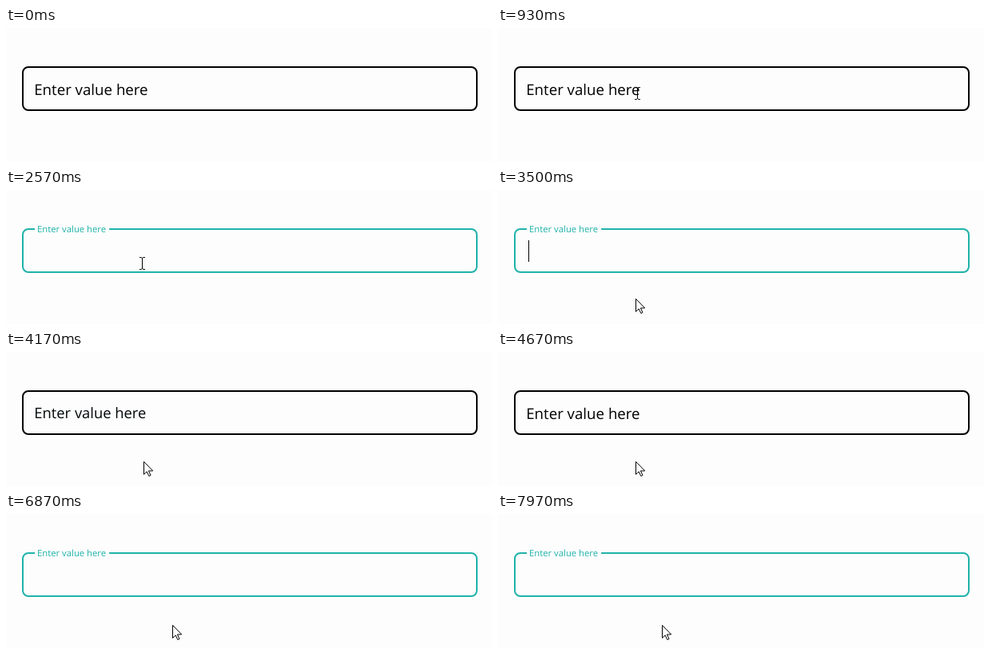
Write an HTML page that moves like this. It is 608 px wide and 168 px high and loops after 8000 ms.

```html
<!DOCTYPE html>
<html lang="en">
<head>
<meta charset="utf-8">
<title>Floating label input</title>
<style>
  html, body { margin: 0; width: 100%; height: 100%; overflow: hidden; background: #fdfdfd; }
  svg { display: block; width: 608px; height: 168px; }
  text { font-family: "Open Sans", "Noto Sans", sans-serif; text-rendering: geometricPrecision; }
</style>
</head>
<body>
<svg viewBox="0 0 608 168">
  <rect width="608" height="168" fill="#fdfdfd"/>
  <rect id="box" x="21" y="49" width="568" height="54" rx="7" fill="none" stroke-width="2"/>
  <rect id="caret" x="38" y="63" width="1" height="27"/>
  <rect id="patch" fill="#fdfdfd"/>
  <text id="label">Enter value here</text>
  <g id="tip">
    <rect x="179" y="107" width="136" height="23" fill="#14141c"/>
    <text x="185.5" y="123" font-size="11.55" fill="#e6e6ea">Please fill out this field.</text>
  </g>
  <path id="beam" fill="none" stroke="#000" d="M-3-7.5H-1L.5-6.5 2-7.5H4M.5-6.5V6.5M-3 7.5H-1L.5 6.5 2 7.5H4"/>
  <path id="arrow" fill="#fff" stroke="#000" d="M.5.5V16.5L4.2 13 6.8 18.6 9 17.6 6.4 12H11.7Z"/>
</svg>
<script>
const LOOP = 8000, BLINK = 530, SHIFT = 300;
const SESSIONS = [[1985, 3950], [5885, Infinity]]; // focus, blur
const TIP = [1720, 1985];
const TEAL = [32, 178, 170];
const MOUSE = [ // time, x, y
  [120, 577, -20], [830, 176, 78], [1150, 170, 92],
  [3180, 170, 92], [3330, 171, 114], [3460, 172, 136], [3620, 172, 137],
  [4950, 172, 137], [5180, 200, 112], [5560, 209, 78],
  [6480, 209, 78], [6670, 211, 130], [6860, 208, 139], [7100, 205, 139]
];

const el = id => document.getElementById(id);
const [box, caret, patch, label, tip, beam, arrow] =
  ["box", "caret", "patch", "label", "tip", "beam", "arrow"].map(el);
const set = (node, attrs) => {
  for (const key in attrs) node.setAttribute(key, attrs[key]);
};
const show = (node, on) => set(node, { visibility: on ? "visible" : "hidden" });
const mix = (a, b, p) => a + (b - a) * p;
const clamp = v => Math.min(1, Math.max(0, v));

// CSS "ease": cubic-bezier(.25, .1, .25, 1)
function ease(x) {
  const curve = (a, b, s) => 3 * a * s * (1 - s) ** 2 + 3 * b * s * s * (1 - s) + s ** 3;
  let lo = 0, hi = 1;
  for (let i = 0; i < 20; i++) {
    const mid = (lo + hi) / 2;
    if (curve(.25, .25, mid) < x) lo = mid; else hi = mid;
  }
  return curve(.1, 1, lo);
}

function mouseAt(t) {
  const i = MOUSE.findIndex(k => k[0] > t);
  if (i === 0) return [-50, -50];
  if (i < 0) return MOUSE[MOUSE.length - 1].slice(1);
  const [t0, x0, y0] = MOUSE[i - 1], [t1, x1, y1] = MOUSE[i];
  const p = (t - t0) / (t1 - t0);
  return [mix(x0, x1, p), mix(y0, y1, p)].map(Math.round);
}

function drawLabel(p) {
  const size = mix(18.7, 11.3, p), x = mix(35.2, 39, p), y = mix(84, 53, p);
  const pad = 4 * p;
  set(label, {
    x, y, "font-size": size,
    fill: `rgb(${TEAL.map(c => Math.round(c * p))})`
  });
  set(patch, {
    x: x - pad + p, y: y - size * 1.07, height: size * 1.34,
    width: label.getComputedTextLength() + 2 * pad - p
  });
}

function render(t) {
  const session = SESSIONS.find(([on, off]) => t >= on && t < off);
  const float = SESSIONS.reduce((sum, [on, off]) =>
    sum + ease(clamp((t - on) / SHIFT)) - ease(clamp((t - off) / SHIFT)), 0);

  set(box, { stroke: session ? `rgb(${TEAL})` : "#000" });
  show(caret, session && Math.floor((t - session[0]) / BLINK) % 2 === 0);
  drawLabel(float);
  show(tip, t >= TIP[0] && t < TIP[1]);

  const [x, y] = mouseAt(t);
  const inside = x > 20 && x < 590 && y > 48 && y < 104;
  show(beam, inside);
  show(arrow, !inside);
  set(inside ? beam : arrow, { transform: `translate(${x} ${y})` });
}

const start = performance.now();
function tick() {
  render((performance.now() - start) % LOOP);
  requestAnimationFrame(tick);
}
tick();
</script>
</body>
</html>
```
